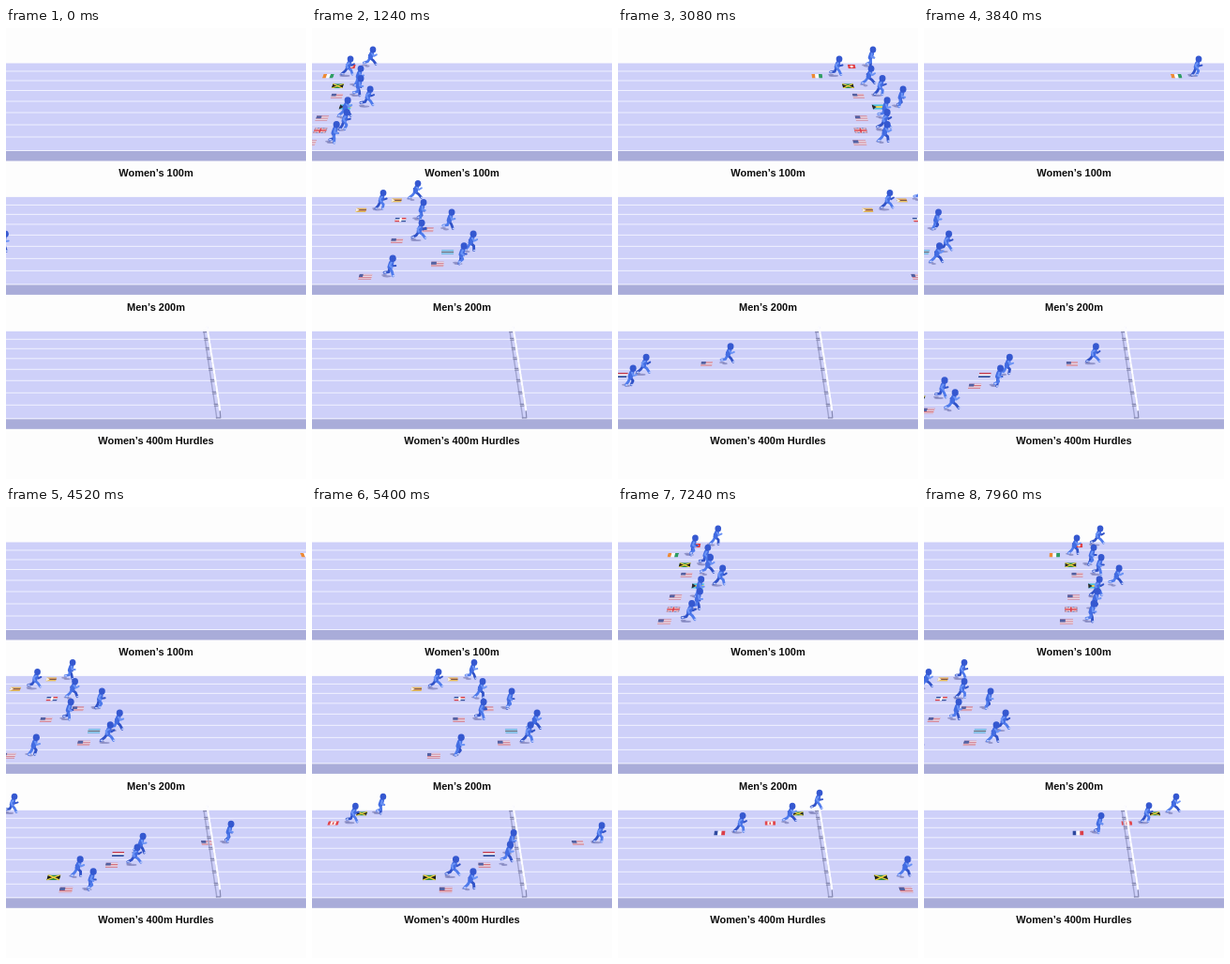
These frames come from a looping animation (320 px wide and 480 px high, 8000 ms). An HTML page with a canvas:

```html
<!DOCTYPE html>
<html lang="en">
<head>
<meta charset="utf-8">
<title>Three races</title>
<style>
  html, body { margin: 0; width: 100%; height: 100%; overflow: hidden; background: #fdfdfd; }
  canvas { position: absolute; left: 0; top: 0; width: 320px; height: 480px; }
  p {
    position: absolute; left: 0; width: 320px; margin: 0; text-align: center;
    font: bold 11px/14px "Liberation Sans", Arial, sans-serif; color: #0b0b0b;
  }
</style>
</head>
<body>
<canvas id="stage"></canvas>
<p style="top:147px">Women’s 100m</p>
<p style="top:289.5px">Men’s 200m</p>
<p style="top:432px">Women’s 400m Hurdles</p>
<script>
const LOOP = 8000, STEP = 40;
const EDGES = [37.5, 46, 56, 66.5, 78, 90, 103, 116, 130.5];
const GROUND = [41, 51.3, 61.7, 72.3, 84, 96, 109, 122.3];

// Lanes run from far to near: flag, then x at each of the race's times.
const races = [
  {
    top: 0, starts: [0, 5630], stride: 440, times: [1240, 2330, 3080, 4520],
    lanes: [
      ['sui', 63, 186, 270], ['civ', 39, 161, 234, 342],
      ['jam', 50, 179, 268], ['usa', 50, 187, 280],
      ['bah', 60, 206, 302], ['usa', 36, 185, 285],
      ['gbr', 35, 183, 285], ['usa', 24, 179, 285]
    ]
  },
  {
    top: 142.4, starts: [0, 3645, 7330], stride: 450, times: [630, 1240, 1755, 2875],
    lanes: [
      ['zim', 41, 111, 171, 300], ['zim', 3, 74, 133, 264],
      ['dom', 41, 117, 180, 318], ['usa', 69, 147, 211],
      ['usa', 35, 115, 181, 325], ['bot', 85, 170, 238],
      ['usa', 75, 160, 231], ['lbr', -6, 84, 157, 318]
    ]
  },
  {
    top: 285.3, starts: [0], stride: 540, times: [3080, 4520, 6520, 7960], hurdles: true,
    lanes: [
      ['jam', -101, 7, 159, 267], ['can', -131, -23, 130, 238],
      ['fra', -190, -79, 75, 187], ['usa', 118, 238, 395],
      ['ned', 28, 144, 301], ['usa', 14, 138, 300],
      ['jam', -44, 77, 246], ['usa', -36, 91, 270]
    ]
  }
];

const canvas = document.getElementById('stage');
const ctx = canvas.getContext('2d');
const dpr = window.devicePixelRatio || 1;
canvas.width = 320 * dpr;
canvas.height = 480 * dpr;

function rect(color, x, y, w, h) {
  ctx.fillStyle = color;
  ctx.fillRect(x, y, w, h);
}

function line(color, width, ...points) {
  ctx.strokeStyle = color;
  ctx.lineWidth = width;
  ctx.beginPath();
  points.forEach(([x, y]) => ctx.lineTo(x, y));
  ctx.stroke();
}

function oval(color, x, y, rx, ry) {
  ctx.fillStyle = color;
  ctx.beginPath();
  ctx.ellipse(x, y, rx, ry, 0, 0, 7);
  ctx.fill();
}

// Flags are painted in a unit square.
function rows(...colors) {
  colors.forEach((c, i) => rect(c, 0, i / colors.length, 1, 1 / colors.length));
}
function columns(...colors) {
  colors.forEach((c, i) => rect(c, i / colors.length, 0, 1 / colors.length, 1));
}
function cross(color, w, h) {
  rect(color, 0.5 - w / 2, 0, w, 1);
  rect(color, 0, 0.5 - h / 2, 1, h);
}
function saltire(color, width) {
  line(color, width, [0, 0], [1, 1]);
  line(color, width, [0, 1], [1, 0]);
}
function stripes(cantonWidth) {
  const red = '#d4707c', white = '#efe3ea';
  rows(red, white, red, white, red, white, red);
  rect('#5261a3', 0, 0, cantonWidth, 0.55);
}
function triangle(color, depth) {
  ctx.fillStyle = color;
  ctx.beginPath();
  ctx.moveTo(0, 0);
  ctx.lineTo(depth, 0.5);
  ctx.lineTo(0, 1);
  ctx.fill();
}

const flags = {
  usa: () => stripes(0.42),
  lbr: () => stripes(0.3),
  sui() {
    rect('#e0393d', 0.15, 0, 0.7, 1);
    rect('#fff', 0.44, 0.2, 0.12, 0.6);
    rect('#fff', 0.32, 0.38, 0.36, 0.24);
  },
  civ: () => columns('#ee8a33', '#fbfbfb', '#2f9d63'),
  jam() {
    rect('#2c8a45', 0, 0, 1, 1);
    triangle('#1c1d20', 0.45);
    ctx.save();
    ctx.translate(1, 0);
    ctx.scale(-1, 1);
    triangle('#1c1d20', 0.45);
    ctx.restore();
    saltire('#f2d13c', 0.17);
  },
  bah() {
    rows('#4cc3dc', '#e9d65c', '#4cc3dc');
    triangle('#2a2c38', 0.35);
  },
  gbr() {
    rect('#46569c', 0, 0, 1, 1);
    saltire('#f3eef4', 0.2);
    saltire('#d65a64', 0.07);
    cross('#f6f2f6', 0.24, 0.42);
    cross('#d8404c', 0.13, 0.24);
  },
  zim() {
    rows('#d9b036', '#f0c035', '#d9702f', '#33261f', '#d9702f', '#f0c035', '#d9b036');
    triangle('#f3ece0', 0.35);
  },
  dom() {
    rect('#35539f', 0, 0, 0.5, 0.5);
    rect('#d8424a', 0.5, 0, 0.5, 0.5);
    rect('#d8424a', 0, 0.5, 0.5, 0.5);
    rect('#35539f', 0.5, 0.5, 0.5, 0.5);
    cross('#fff', 0.18, 0.3);
  },
  bot() {
    rect('#7cb9e2', 0, 0, 1, 1);
    rect('#f2f5fa', 0, 0.36, 1, 0.28);
    rect('#3c4150', 0, 0.42, 1, 0.16);
  },
  ned: () => rows('#c4384a', '#fafafa', '#33519d'),
  can() {
    rect('#e2474c', 0, 0, 1, 1);
    rect('#fafafa', 0.25, 0, 0.5, 1);
    rect('#e2474c', 0.42, 0.25, 0.16, 0.5);
  },
  fra: () => columns('#2f4aa0', '#fafafa', '#dc3f49')
};

function drawFlag(kind, x, y, lane) {
  const w = 11 + lane * 0.45, h = 4.3 + lane * 0.24, lean = (x - 160) / 390;
  ctx.save();
  ctx.transform(w, 0, lean * h, h, x - w / 2 - lean * h / 2, y - h / 2);
  ctx.beginPath();
  ctx.rect(0, 0, 1, 1);
  ctx.clip();
  flags[kind]();
  ctx.restore();
}

const along = ([x, y], angle, length) =>
  [x + Math.sin(angle) * length, y + Math.cos(angle) * length];

function leg(color, phase, leap) {
  const thigh = 0.15 + 0.8 * Math.sin(phase) * (1 + leap * 0.3);
  const shin = thigh - 0.25 - 1.1 * Math.max(0, Math.cos(phase)) * (1 - leap * 0.5);
  const hip = [-1, -9.2], knee = along(hip, thigh, 4.6), foot = along(knee, shin, 4.5);
  line(color, 2.7, hip, knee, foot);
  line('#bccafa', 1.5, foot, [foot[0] + 1.3, foot[1] - 0.1]);
}

function arm(color, phase) {
  const swing = -0.15 + 0.9 * Math.sin(phase);
  const shoulder = [0.8, -14], elbow = along(shoulder, swing, 3.6);
  line(color, 1.9, shoulder, elbow, along(elbow, swing + 1.4, 3.2));
}

function drawRunner(x, y, lane, phase, leap) {
  const far = '#3153c8', near = '#4f7bec';
  ctx.save();
  ctx.translate(x, y - leap * 4);
  ctx.scale(1 + lane * 0.012, 1 + lane * 0.012);
  arm(far, phase);
  leg(far, phase + Math.PI, leap);
  leg(near, phase, leap);
  line('#426ce2', 5, [-0.7, -9.8], [0.6, -13.6]);
  arm('#6b93f5', phase + Math.PI);
  oval('#3558d0', 2, -18, 3.3, 3.5);
  ctx.restore();
}

function drawShadow(x, y, phase) {
  const reach = 1.5 * Math.sin(phase);
  const color = 'rgba(108,112,172,.6)';
  oval(color, x - 4, y - 0.4, 4 + reach, 1.1);
  oval(color, x - 7, y - 1.6, 3, 1);
}

function drawTrack() {
  rect('#ced0f9', 0, 37.5, 320, 93);
  EDGES.slice(1).forEach(y => rect('#f0f1ff', 0, y - 0.5, 320, 1));
  rect('#a9acd9', 0, 131, 320, 10.5);
}

const hurdleX = y => 213 + (y - 37.5) * 0.15;

function drawHurdles() {
  for (let i = 0; i < 8; i++) {
    const far = EDGES[i] + 0.8, near = EDGES[i + 1] - 1;
    const a = hurdleX(far), b = hurdleX(near), rise = 5.5 + i * 0.4;
    line('#a0a3cf', 1.4, [a - 2, far], [b - 2, near]);
    for (const [x, y] of [[a, far], [b, near]]) {
      line('#8588b2', 1.2, [x - 2.5, y], [x + 2, y], [x + 1.4, y - rise]);
    }
    line('#fcfcff', 2.2, [a + 1.4, far - rise], [b + 1.4, near - rise]);
  }
}

function position(times, xs, t) {
  let i = 0;
  while (i < xs.length - 2 && t > times[i + 1]) i++;
  return xs[i] + (xs[i + 1] - xs[i]) * (t - times[i]) / (times[i + 1] - times[i]);
}

function runnersAt(race, t) {
  const found = [];
  race.lanes.forEach(([kind, ...xs], lane) => {
    for (const start of race.starts) {
      const x = position(race.times, xs, t - start), y = GROUND[lane];
      if (x < -20 || x > 365) continue;
      const phase = (t - start) / race.stride * 2 * Math.PI + lane * 2.4;
      const gap = (x - hurdleX(y)) / 25;
      const leap = race.hurdles ? Math.max(0, 1 - gap * gap) : 0;
      found.push({ kind, lane, x, y, phase, leap });
    }
  });
  return found;
}

function drawRace(race, t) {
  const runners = runnersAt(race, t);
  ctx.save();
  ctx.translate(0, race.top);
  drawTrack();
  for (const r of runners) {
    drawFlag(r.kind, r.x - 20.8 - r.lane * 0.9, r.y, r.lane);
    drawShadow(r.x, r.y, r.phase);
  }
  if (race.hurdles) drawHurdles();
  for (const r of runners) drawRunner(r.x, r.y, r.lane, r.phase, r.leap);
  ctx.restore();
}

function draw(elapsed) {
  const t = Math.floor(elapsed % LOOP / STEP) * STEP;
  ctx.setTransform(dpr, 0, 0, dpr, 0, 0);
  ctx.lineJoin = 'round';
  rect('#fdfdfd', 0, 0, 320, 480);
  ctx.lineCap = 'round';
  races.forEach(race => drawRace(race, t));
}

const begin = performance.now();
function tick() {
  draw(performance.now() - begin);
  requestAnimationFrame(tick);
}
tick();
</script>
</body>
</html>
```
